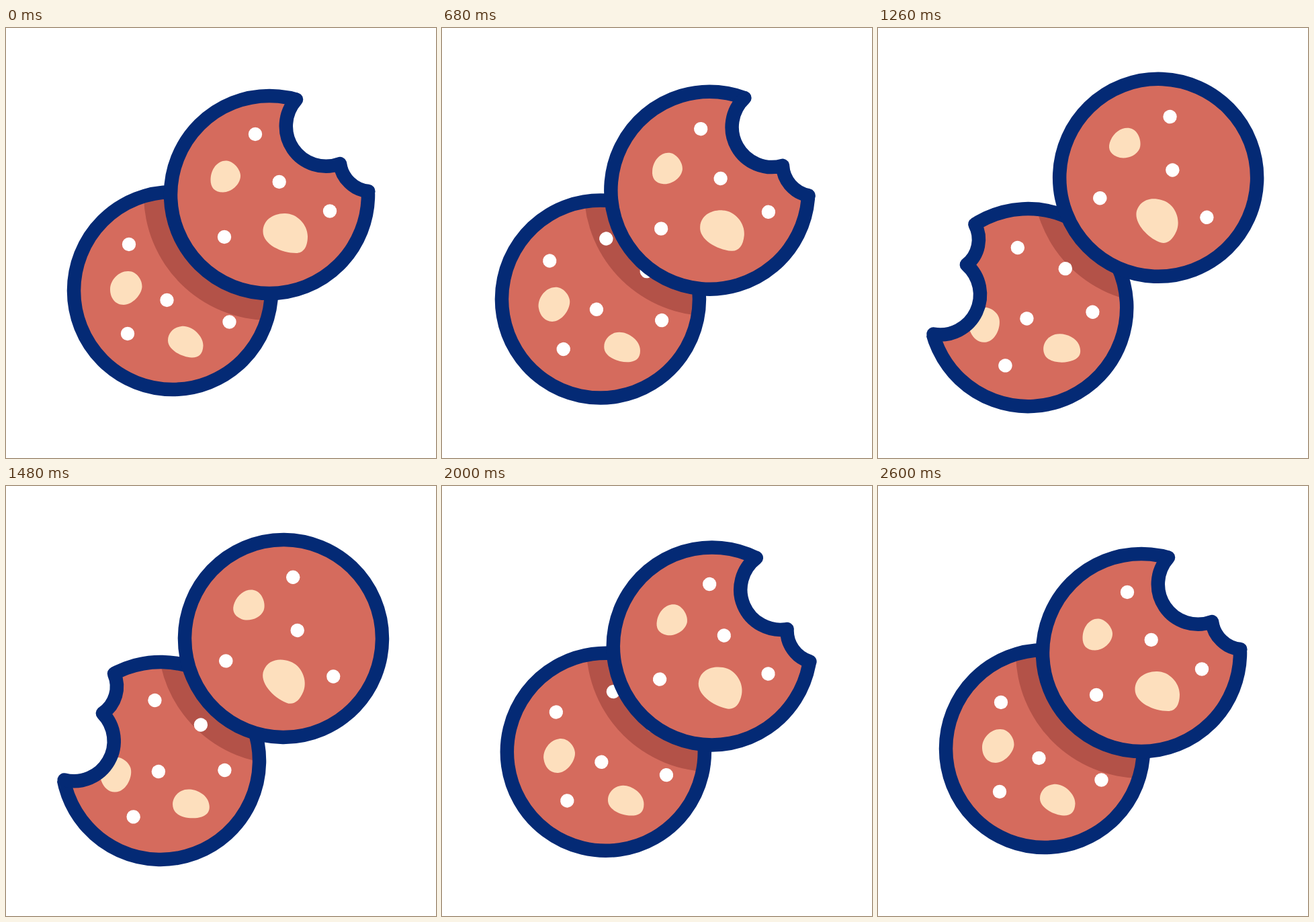
An HTML page without scripts that plays this animation: 640x640 px, repeating every 3.6 s.

```html
<!DOCTYPE html>
<html lang="en">
<head>
<meta charset="utf-8">
<title>Cookies</title>
<style>
  html, body { margin: 0; width: 100%; height: 100%; overflow: hidden; background: #fff; }
  svg { display: block; width: 100%; height: 100%; }

  .dough { fill: #d56b5d; }
  .shade { fill: #b35248; }
  .nut { fill: #fddfbd; }
  .sugar { fill: #fff; }
  .ring, .edge, .spark { fill: none; stroke: #042a75; stroke-width: 20.5; stroke-linecap: round; stroke-linejoin: round; }
  .spark { stroke: #67cdd2; stroke-width: 20; }

  .top { animation: top 3.6s linear infinite; }
  .low { animation: low 3.6s linear infinite; }
  .top-bite { animation: top-bite 3.6s step-end infinite; }
  .low-bite { animation: low-bite 3.6s step-end infinite; }
  .burst { --wait: .94s; }
  .burst.late { --wait: 1.84s; }
  .spark { opacity: 0; animation: burst 3.6s linear var(--wait) infinite; }

  @keyframes top {
    0% { translate: 392px 248px; rotate: 0deg; }
    5.56% { translate: 392.3px 247.7px; rotate: .1deg; }
    12.78% { translate: 394px 246px; rotate: 1.1deg; }
    15.56% { translate: 395.7px 244.3px; rotate: 2.4deg; }
    18.89% { translate: 398.3px 241.7px; rotate: 4.9deg; }
    23.61% { translate: 406.4px 233.6px; rotate: 12.3deg; }
    28.33% { translate: 415px 225px; rotate: 20.2deg; }
    30.56% { translate: 417.3px 222.7px; rotate: 22.5deg; }
    33.33% { translate: 418px 222px; rotate: 24deg; }
    36.94% { translate: 416.2px 223.8px; rotate: 24deg; }
    41.11% { translate: 413px 227px; rotate: 22deg; }
    45.83% { translate: 409.7px 230.3px; rotate: 18.9deg; }
    55.56% { translate: 401.8px 238.4px; rotate: 10.9deg; }
    60.83% { translate: 398px 242px; rotate: 6.8deg; }
    66.67% { translate: 394.2px 245.8px; rotate: 2.7deg; }
    72.22%, 100% { translate: 392px 248px; rotate: 0deg; }
  }
  @keyframes low {
    0% { translate: 248px 391px; rotate: 0deg; }
    5.56% { translate: 247.4px 391.6px; rotate: -.3deg; }
    12.78% { translate: 244px 395.5px; rotate: -3deg; }
    15.56% { translate: 240.4px 399px; rotate: -5.7deg; }
    18.89% { translate: 236px 403.5px; rotate: -9.7deg; }
    23.61% { translate: 227.3px 412.2px; rotate: -17.4deg; }
    28.33% { translate: 221px 418.5px; rotate: -24.5deg; }
    30.56% { translate: 220.2px 419.2px; rotate: -25.8deg; }
    33.33% { translate: 221.5px 418px; rotate: -25.8deg; }
    36.94% { translate: 225.2px 414px; rotate: -23.9deg; }
    41.11% { translate: 230px 409px; rotate: -20.5deg; }
    45.83% { translate: 234.2px 405px; rotate: -16.3deg; }
    55.56% { translate: 243.8px 395.8px; rotate: -8deg; }
    60.83% { translate: 246px 393.2px; rotate: -4.7deg; }
    66.67% { translate: 247.5px 391.6px; rotate: -1.7deg; }
    72.22%, 100% { translate: 248px 391px; rotate: 0deg; }
  }
  @keyframes top-bite {
    0%, 51.1%, 100% { visibility: visible; }
    26.1% { visibility: hidden; }
  }
  @keyframes low-bite {
    0%, 51.1%, 100% { visibility: hidden; }
    26.1% { visibility: visible; }
  }
  @keyframes burst {
    0% { opacity: 1; stroke-dasharray: .1 200; stroke-dashoffset: 0; }
    2.22% { stroke-dasharray: 24 200; stroke-dashoffset: -2; }
    4.44% { stroke-dasharray: 35 200; stroke-dashoffset: -20; }
    7.2% { opacity: 1; stroke-dasharray: .5 200; stroke-dashoffset: -62; }
    7.21%, 100% { opacity: 0; stroke-dasharray: .5 200; stroke-dashoffset: -62; }
  }
</style>
</head>
<body>
<svg viewBox="0 0 640 640">
  <defs>
    <clipPath id="low-area"><circle class="low" r="140"/></clipPath>
    <circle id="dot" class="sugar" r="10.2"/>
    <g id="rays">
      <path class="spark" d="M45 0H108" transform="rotate(-45)"/>
      <path class="spark" d="M45 0H108"/>
      <path class="spark" d="M45 0H108" transform="rotate(45)"/>
    </g>
  </defs>

  <circle class="low dough" r="147"/>
  <g clip-path="url(#low-area)"><circle class="top shade" r="187"/></g>
  <g class="low">
    <path class="nut" d="M-67-29C-54-30-45-16-45.5-6C-46 6-60 21-73 21C-86 21-93 10-93-2C-93-16-80-29-67-29Z"/>
    <path class="nut" d="M13 53C28 51 46 67 45.5 82C45 95 38 100 28 99.5C14 99-7 88-7 74C-7 62 3 54 13 53Z"/>
    <use href="#dot" x="-65" y="-69"/>
    <use href="#dot" x="-8.5" y="14"/>
    <use href="#dot" x="84.5" y="46.5"/>
    <use href="#dot" x="-67" y="64"/>
    <use href="#dot" x="23.5" y="-87.3"/>
    <use href="#dot" x="74.8" y="-29.2"/>
    <circle class="ring" r="147"/>
    <g class="low-bite">
      <path fill="#fff" d="M-144.3-23.5A59.5 59.5 0 0 0-56-96.4A48 48 0 0 0-19.4-145.6L-21.4-160.6A162 162 0 0 0-159.9-26Z"/>
      <path class="edge" d="M-144.3-23.5A59.5 59.5 0 0 0-56-96.4A48 48 0 0 0-19.4-145.6"/>
    </g>
  </g>

  <g class="top">
    <circle class="dough" r="147"/>
    <path class="nut" d="M-64-50.5C-53-50-43-37-43-28C-43-15-57-3.5-69-3.5C-82-3.5-87.5-11-87.5-22C-87.5-38-77-51-64-50.5Z"/>
    <path class="nut" d="M22 28C40 27 57 44 57 62C57 79 50 87 40 87C18 87-9.5 74-9.5 55C-9.5 38 5 28.5 22 28Z"/>
    <use href="#dot" x="-21" y="-90"/>
    <use href="#dot" x="14.7" y="-19"/>
    <use href="#dot" x="90" y="24.5"/>
    <use href="#dot" x="-67" y="63"/>
    <circle class="ring" r="147"/>
    <g class="top-bite">
      <path fill="#fff" d="M40-141.5A59.5 59.5 0 0 0 105-46A48 48 0 0 0 147.3-5L162-5.5A162 162 0 0 0 44-156Z"/>
      <path class="edge" d="M40-141.5A59.5 59.5 0 0 0 105-46A48 48 0 0 0 147.3-5"/>
    </g>
  </g>

  <g class="burst"><use href="#rays" transform="translate(135 373) rotate(196.5)"/></g>
  <g class="burst late"><use href="#rays" transform="translate(494 210) rotate(-41.5)"/></g>
</svg>
</body>
</html>
```
